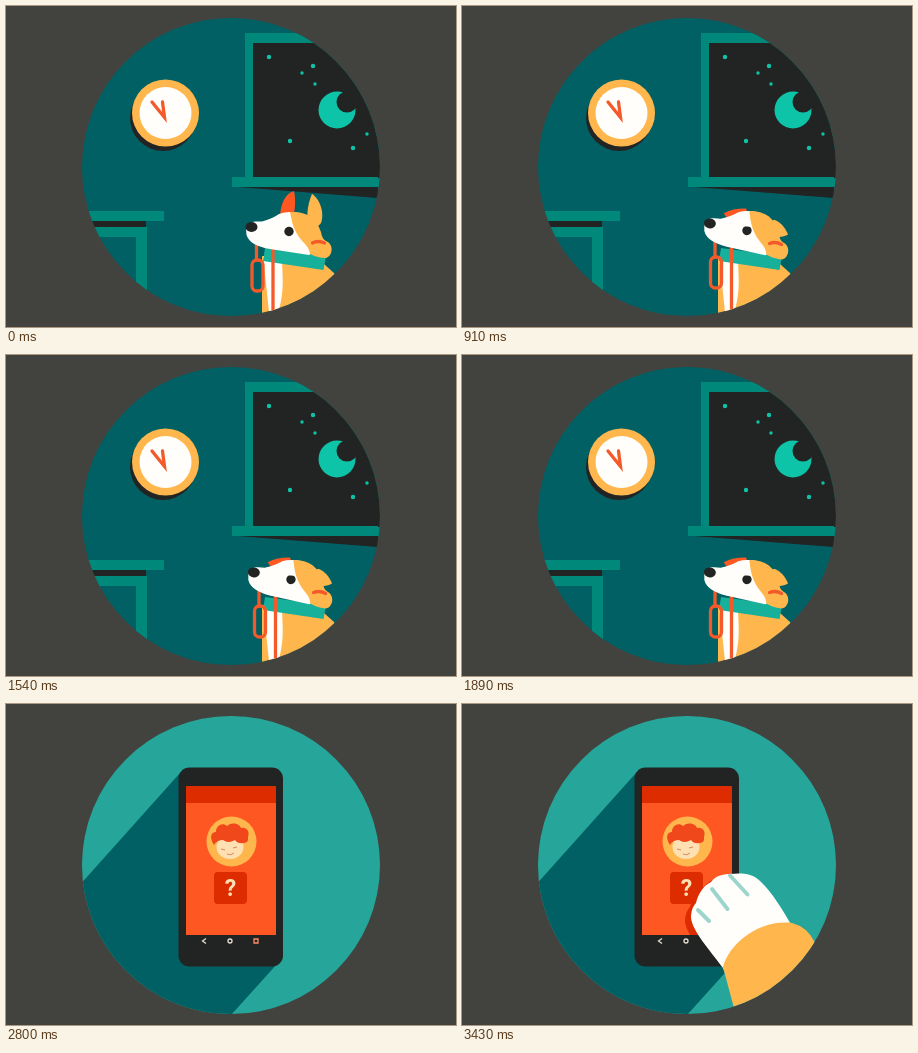
Recreate the animation shown at these times as an HTML page. Size 450 px wide and 321 px high, loop 3500 ms.

```html
<!DOCTYPE html>
<html lang="en">
<head>
<meta charset="utf-8">
<title>Late evening call</title>
<style>
  html, body { margin: 0; height: 100%; overflow: hidden; background: #42433f; }
  svg { display: block; width: 100vw; height: 100vh; }
  .wall { fill: #006064; }
  .frame { fill: #00897b; }
  .mint { fill: #26a69a; }
  .moon { fill: #0ec4a8; }
  .band { fill: #17b09b; }
  .ink { fill: #212423; }
  .gold { fill: #ffb74d; }
  .white { fill: #fffefa; }
  .red { fill: #ff5722; }
  .deep { fill: #dd2c00; }
  .hair { fill: #f0481a; }
  .cream { fill: #ffe0b2; }
  .line { fill: none; stroke: #f4592a; stroke-width: 3.3; stroke-linecap: round; }
  text { font: bold 23px Roboto, Arial, sans-serif; text-anchor: middle; }
</style>
</head>
<body>
<svg viewBox="0 0 450 321">
  <clipPath id="disc"><circle cx="225" cy="161" r="149"/></clipPath>
  <clipPath id="lid"><rect id="lidBox" x="275" y="218" width="18" height="16"/></clipPath>
  <clipPath id="screen"><path d="M180 82H270V231H180Z"/></clipPath>

  <g id="room" clip-path="url(#disc)">
    <rect class="wall" width="450" height="321"/>

    <!-- window -->
    <path class="frame" d="M239 27H380V181H239Z"/>
    <path class="ink" d="M247 37H380V172H247ZM232 181H372V192Z"/>
    <path class="frame" d="M226 171H372V181H226Z"/>
    <circle class="moon" cx="331" cy="104" r="18.5"/>
    <circle class="ink" cx="341" cy="96" r="10.5"/>
    <g id="stars" class="moon"></g>

    <!-- clock -->
    <circle class="ink" cx="157" cy="112" r="33"/>
    <circle class="gold" cx="159.500" cy="107" r="33.500"/>
    <circle class="white" cx="159.500" cy="107" r="26"/>
    <path class="line" d="M146 96L158.500 111.500L156.500 96"/>

    <!-- table -->
    <path class="frame" d="M70 205H158V215H70ZM70 221H141V290H130V231H70Z"/>
    <path class="ink" d="M70 215H140V221H70Z"/>

    <path id="glow" class="mint" d="M207 273L229 279L239 300L236 312L202 307Z"/>

    <!-- dog -->
    <path id="body" class="gold"/>
    <path id="chest" class="white"/>
    <path id="collar" class="band"/>
    <g id="leash" class="line">
      <path d="M250.500 234V254M267 240V320"/>
      <rect x="246" y="254" width="11" height="31" rx="5"/>
    </g>
    <g id="head">
      <path id="earL" class="red" d="M274 212C274 200 278 188 288 185C290 194 289 204 287 212Z"/>
      <path class="white" d="M240 222C241 216 247 215 256 215.500Q266 213 273 208Q278 206 284 206C297 206 308 212 314 226L316 240L303 249L264 243C252 241 243 237 240.500 229Z"/>
      <path class="gold" d="M284 206C300 205 310 211 315 226Q316 233 320 235C328 238 327 250 320 252Q312 252 304 248C303 240 298 238 293 231C287 222 286 216 284 206Z"/>
      <path id="earR" class="gold" d="M302 217C300 206 303 195 306 188C313 192 319 206 315 217Q309 225 302 217Z"/>
      <path class="line" d="M306.500 237Q312 234 318.500 237"/>
      <ellipse class="ink" cx="245.500" cy="221" rx="6" ry="5"/>
      <circle class="ink" cx="283" cy="225.500" r="4.700" clip-path="url(#lid)"/>
    </g>
  </g>

  <g id="call" clip-path="url(#disc)">
    <rect class="mint" width="450" height="321"/>
    <path class="wall" d="M174 69L62 194V321H216L271 260Z"/>
    <rect class="ink" x="172.500" y="63.500" width="104.500" height="199" rx="11"/>
    <path class="red" d="M180 82H270V231H180Z"/>
    <path class="deep" d="M180 82H270V99H180Z"/>

    <!-- portrait -->
    <circle class="gold" cx="225.500" cy="137.500" r="25"/>
    <ellipse class="cream" cx="224" cy="143" rx="13.500" ry="12"/>
    <path class="hair" d="M208 141C203 133 205 128 210 128C210 121 217 118 221 122C226 117 234 120 235 124C241 123 244 128 242 133Q243 139 237 139Q232 140 229 136Q222 140 217 136Q211 136 208 141Z"/>
    <path d="M215 145l4 1M227 144l4-1M221 150q4 2 7-1" fill="none" stroke="#d9875c"/>

    <rect class="deep" x="208" y="168" width="33" height="32" rx="4"/>
    <text class="cream" x="224.500" y="191.500">?</text>
    <g fill="none" stroke="#e8ddd0" stroke-width="1.300">
      <path d="M200 234.500L196.500 237L200 239.500"/>
      <circle cx="224" cy="237" r="2"/>
      <path d="M248 235H252V239H248Z" stroke="#ff8a65"/>
    </g>

    <g clip-path="url(#screen)"><use id="shade" class="deep" href="#hand"/></g>
    <g id="paw">
      <g class="white"><path id="hand" fill="inherit" d="M229 214C229 207 231 202 234 199C236 190 242 181 249 178C253 172 261 170 268 170C279 169 290 169 298 177C311 189 321 207 330 222L352 240L275 300L261 264C247 245 231 228 229 214Z"/></g>
      <path class="gold" d="M261 263C267 240 297 215 330 219Q345 223 352 237L430 330L290 360L272 304Z"/>
      <path d="M236 206L247 217M250 185L265.500 205M268 171.500L285.500 190.500" fill="none" stroke="#9dd5cd" stroke-width="4" stroke-linecap="round"/>
    </g>
  </g>
</svg>
<script>
const LOOP = 3500, STEP = 70, CUT = 2590;
const $ = id => document.getElementById(id);
const set = (id, name, value) => $(id).setAttribute(name, value);

const stars = [[263, 51], [296, 67], [307, 60], [309, 78], [284, 135], [361, 128], [347, 142]];
$("stars").innerHTML = stars.map(([x, y], i) =>
  `<circle cx="${x}" cy="${y}" r="${i % 2 ? 1.7 : 2.2}"/>`).join("");

// head: x, y, turn; ears: turn and length; leash: x, y
const alert = [283, 225, 0, 0, 1, 0, 1, 0, 0];
const sad = [285, 224, 4, -108, .85, 122, .68, 2.5, -3];
const look = [262, 251, -29, -70, .85, 72, .76, -7.5, 40];

const shapes = {
  body: ["M256 250L318 258L328 267L345 315L256 315Z", "M250 272L308 262L328 267L345 315L247 315Z"],
  chest: ["M257 250L276 252C276 270 280 288 269 315L264 315Z", "M250 270L276 275C266 283 263 292 261 315L247 315Z"],
  collar: ["M259 242L320 250L317.5 264L257 255Z", "M257 273L306 251L312 265L262 283Z"]
};

const ramp = (t, from, to) => {
  const k = Math.min(1, Math.max(0, (t - from) / (to - from)));
  return k * k * (3 - 2 * k);
};
const lerp = (a, b, k) => a + (b - a) * k;
const mix = (a, b, k) => a.map((v, i) => lerp(v, b[i], k));
const morph = (a, b, k) => {
  const end = b.match(/[\d.]+/g);
  let i = 0;
  return a.replace(/[\d.]+/g, v => lerp(+v, +end[i++], k));
};

function ear(id, x, y, turn, size) {
  set(id, "transform", `translate(${x} ${y}) rotate(${turn}) scale(1 ${size}) translate(${-x} ${-y})`);
}

function drawDog(t) {
  const droop = ramp(t, 660, 900), turn = ramp(t, 1890, 2200);
  const [x, y, r, l, ls, q, qs, dx, dy] = mix(mix(alert, sad, droop), look, turn);
  set("head", "transform", `translate(${x} ${y}) rotate(${r}) translate(-283 -225)`);
  ear("earL", 281, 210, l, ls);
  ear("earR", 307, 217, q, qs);
  set("leash", "transform", `translate(${dx} ${dy})`);
  for (const id in shapes) set(id, "d", morph(...shapes[id], turn));
  const lid = lerp(6.5 * ramp(t, 420, 540), 3.5, droop) * (1 - turn);
  set("lidBox", "y", 218 + lid);
  set("glow", "opacity", .65 * ramp(t, 2150, 2320));
}

function drawPaw(t) {
  const away = 1 - ramp(t, 3080, 3430), x = 130 * away, y = 145 * away;
  set("paw", "transform", `translate(${x} ${y})`);
  set("shade", "transform", `translate(${x - 6} ${y + 4})`);
}

function draw() {
  const t = Math.floor(performance.now() / STEP) * STEP % LOOP;
  const calling = t >= CUT;
  $("room").style.display = calling ? "none" : "";
  $("call").style.display = calling ? "" : "none";
  if (calling) drawPaw(t); else drawDog(t);
  requestAnimationFrame(draw);
}
draw();
</script>
</body>
</html>
```
